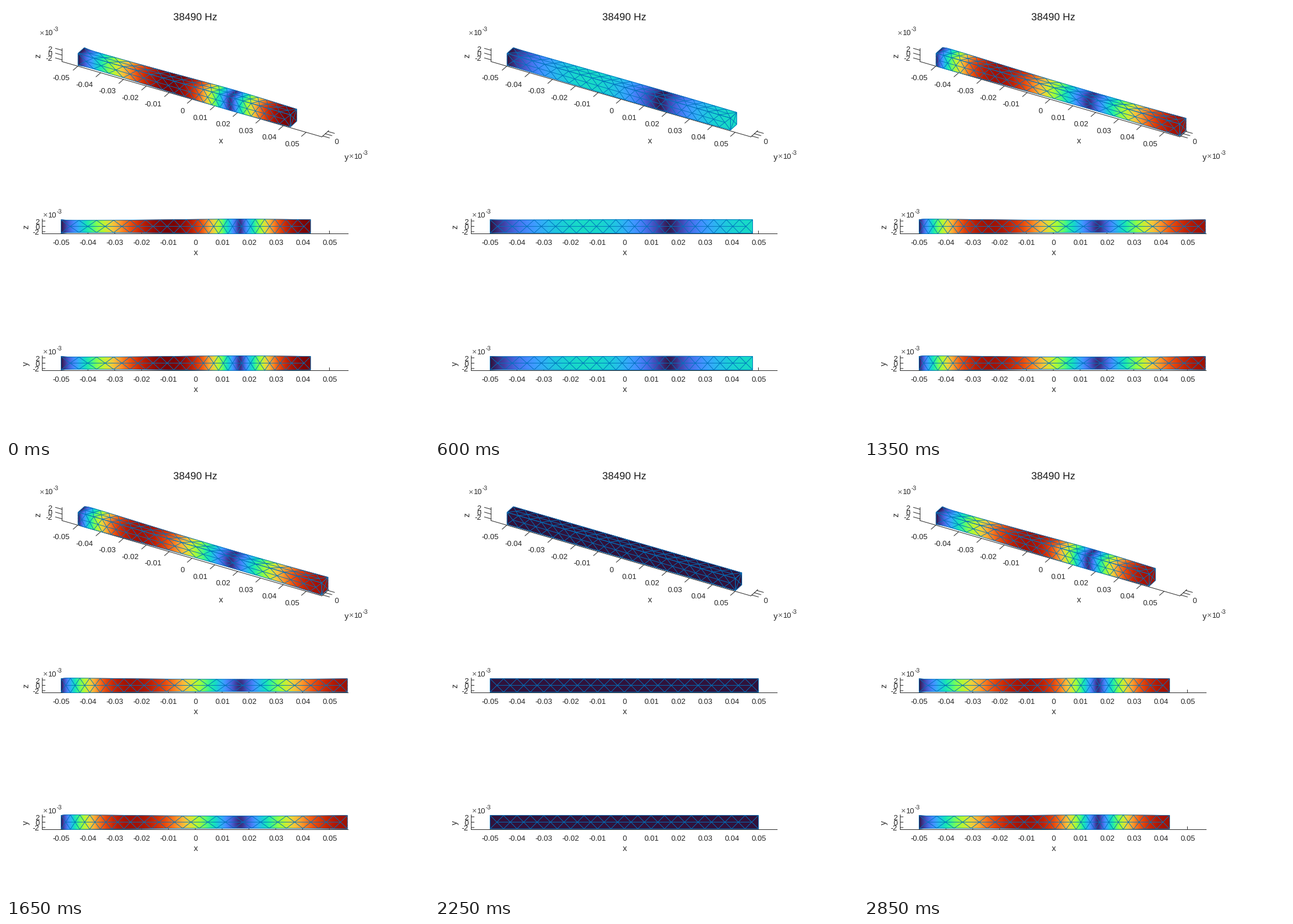
A matplotlib script for the animation above (3 s loop, 741x756 px).

```python
import numpy as np
import matplotlib.pyplot as plt
from matplotlib.animation import FuncAnimation
from matplotlib.collections import LineCollection

W, H, DPI = 741, 756, 64
FRAMES, INTERVAL = 20, 150
PT = 72 / DPI                  # points per pixel

HALF_LEN, HALF = 50, 2.5       # bar half sizes in mm
X_LIM, YZ_LIM = 56.9, 2.73
AMP, POISSON = 7.02, 0.3
CELLS = 20

INK, PALE = "#262626", "#5a5a5a"
EDGE = (0, 114 / 255, 189 / 255)

plt.rcParams["font.family"] = "Liberation Sans"
plt.rcParams["text.hinting"] = "none"
plt.rcParams["path.snap"] = False

fig = plt.figure(figsize=(W / DPI, H / DPI), dpi=DPI, facecolor="white")
ax = fig.add_axes([0, 0, 1, 1])
ax.set_xlim(0, W)
ax.set_ylim(H, 0)
ax.set_autoscale_on(False)
ax.axis("off")


# --- projections from mm to pixels ---

def iso(x, y, z):
    return 331.8 + 4.0 * x + 2.2 * y, 146.6 + 1.16 * x - 2 * y - 4.2 * z


def side(x, y, z):
    return 331.6 + 4.7 * x, 386.6 - 4.7 * z


def plan(x, y, z):
    return 331.6 + 4.7 * x, 626.4 - 4.7 * y


# --- static axes and text ---

def text(x, y, s, size=13.2, ha="center", color=INK):
    """Place text with its digits centred vertically on y."""
    ax.text(x, y + 0.36 * size, s, fontsize=size * PT, ha=ha,
            va="baseline", color=color)


def upright(x, y, s):
    ax.text(x, y, s, fontsize=14.5 * PT, rotation=90, ha="center",
            va="center", color=INK)


def line(p, q):
    ax.plot([p[0], q[0]], [p[1], q[1]], color=INK, lw=PT, zorder=1)


def tick(p, dx, dy):
    line(p, (p[0] + dx, p[1] + dy))


def exponent(x, y):
    text(x, y, "×", 14, "left", PALE)
    text(x + 9.5, y - 0.5, "10", 13.2, "left")
    text(x + 24.3, y - 6.5, "-3", 10.5, "left")


def x_name(v):
    return f"{v / 1000:.2f}" if v else "0"


def flat_axes(y0, name):
    base, mid = y0 + 12.5, y0 - 0.5
    line((63.5, base), (599.5, base))
    line((63.5, base), (63.5, y0 - 13.3))
    for v in range(-50, 51, 10):
        x = 331.6 + 4.7 * v
        tick((x, base), 0, -5)
        text(x + 0.4, y0 + 27, x_name(v))
    for v in (-2, 0, 2):
        tick((63.5, mid - 4.7 * v), 5, 0)
        text(58.5, y0 - 4.7 * v + 0.3, str(v), ha="right")
    text(332, y0 + 45, "x", 14.5)
    upright(35.5, y0, name)
    exponent(64.5, y0 - 20.5)


def iso_axes():
    low = -YZ_LIM
    corner = iso(-X_LIM, low, low)
    right = iso(X_LIM, low, low)
    line(corner, right)
    line(corner, iso(-X_LIM, low, YZ_LIM))
    line(right, iso(X_LIM, YZ_LIM, low))
    for i, v in enumerate(range(-50, 51, 10)):
        tick(iso(v, low, low), -8, 7)
        text(112 + 40.2 * i, 125.3 + 11.57 * i, x_name(v), ha="right")
    for v in (-2, 0, 2):
        tick(iso(-X_LIM, low, v), -11.5, -3.3)
        text(81, 83.2 - 4.1 * v, str(v), ha="right")
        tick(iso(X_LIM, v, low), 11.5, 3.3)
    text(579, 237.5, "0")
    text(376.5, 235.5, "x", 14.5)
    text(596.5, 265.5, "y", 14.5)
    upright(57, 87, "z")
    exponent(58, 47)
    exponent(600, 263.5)


text(331.7, 18, "38490 Hz", 18, color="#1a1a1a")
iso_axes()
flat_axes(387, "z")
flat_axes(627, "y")


# --- bar faces: grids for shading, node paths for the mesh ---

def front(a, b):
    return a, np.full_like(a, -HALF), b


def top(a, b):
    return a, b, np.full_like(a, HALF)


def end(a, b):
    return np.full_like(a, HALF_LEN), a, b


def side_mesh():
    """Crossed cells joined by a centre line, as (start, end) pairs."""
    step = 2 * HALF_LEN / CELLS
    segs = []
    for i in range(CELLS):
        l = -HALF_LEN + i * step
        r, m = l + step, l + step / 2
        for b in (-HALF, HALF):
            segs += [((l, b), (r, b)), ((l, b), (m, 0)), ((m, 0), (r, b))]
        if i:
            segs.append(((m - step, 0), (m, 0)))
    for x in (-HALF_LEN, HALF_LEN):
        segs.append(((x, -HALF), (x, HALF)))
    return segs


def end_mesh():
    c = [(-HALF, -HALF), (HALF, -HALF), (HALF, HALF), (-HALF, HALF)]
    return [(c[i], c[(i + 1) % 4]) for i in range(4)] + [(p, (0, 0)) for p in c]


def subdivide(segs, n=7):
    segs = np.array(segs, float)
    t = np.linspace(0, 1, n)[None, :, None]
    pts = segs[:, :1] * (1 - t) + segs[:, 1:] * t
    return pts[..., 0], pts[..., 1]


LONG_GRID = np.meshgrid(np.linspace(-HALF_LEN, HALF_LEN, 201),
                        np.linspace(-HALF, HALF, 5))
END_GRID = np.meshgrid(*[np.linspace(-HALF, HALF, 5)] * 2)
LONG_MESH = subdivide(side_mesh())
END_MESH = subdivide(end_mesh())

PARTS = [
    (iso, top, LONG_GRID, LONG_MESH),
    (iso, front, LONG_GRID, LONG_MESH),
    (iso, end, END_GRID, END_MESH),
    (side, front, LONG_GRID, LONG_MESH),
    (plan, top, LONG_GRID, LONG_MESH),
]


def deform(x, y, z, swing):
    """Second longitudinal mode of a clamped-free rod, with its magnitude."""
    s = (x + HALF_LEN) / (2 * HALF_LEN)
    k = 1.5 * np.pi
    u = AMP * np.sin(k * s) * swing
    strain = AMP * k / (2 * HALF_LEN) * np.cos(k * s) * swing
    squeeze = -POISSON * strain * np.tanh(s / 0.02)
    v, w = squeeze * y, squeeze * z
    size = np.sqrt(u ** 2 + v ** 2 + w ** 2) / AMP
    return (x + u, y + v, z + w), size


drawn = []


def update(i):
    while drawn:
        drawn.pop().remove()
    swing = np.cos(2 * np.pi * i / FRAMES)
    for project, face, grid, mesh in PARTS:
        pos, size = deform(*face(*grid), swing)
        px, py = project(*pos)
        drawn.append(ax.pcolormesh(px, py, size, shading="gouraud",
                                   cmap="turbo", vmin=0, vmax=1, zorder=2))
        pos, _ = deform(*face(*mesh), swing)
        paths = np.stack(project(*pos), axis=-1)
        drawn.append(ax.add_collection(
            LineCollection(paths, colors=[EDGE], linewidths=0.95 * PT, zorder=3),
            autolim=False))
    return drawn


anim = FuncAnimation(fig, update, frames=FRAMES, interval=INTERVAL,
                     init_func=lambda: [], repeat=True, repeat_delay=0)
plt.show()
```
